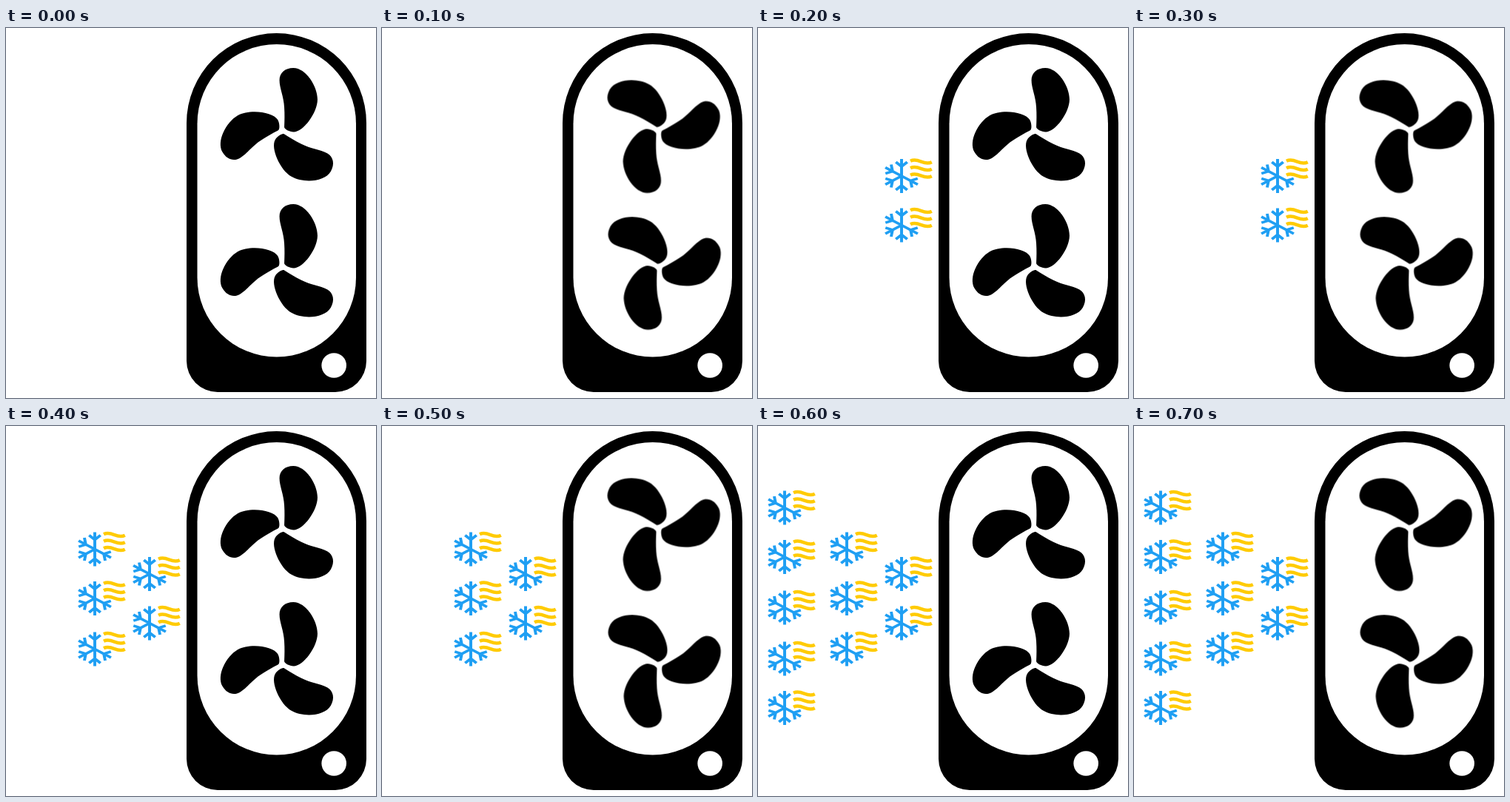
An HTML page for the animation above (800 ms loop, 500x500 px).

```html
<!DOCTYPE html>
<html lang="en">
<head>
<meta charset="utf-8">
<title>Outdoor cooling unit</title>
<style>
  html, body { margin: 0; width: 100%; height: 100%; overflow: hidden; background: #fff; }
  svg { display: block; width: 100%; height: 100%; }
  .ice { fill: none; stroke: #1f9ff3; stroke-width: 3.6; }
  .air { fill: none; stroke: #ffcb05; stroke-width: 4.4; }
</style>
</head>
<body>
<svg viewBox="0 0 500 500">
  <defs>
    <path id="blade" d="M-3.7-68C-3.7-78 4-84.5 15-84.5C32-84.5 47.7-60 47.7-42C47.7-24 28.5 2 15.5 2C10 2 2.3-2 2.8-5C3.2-14 3.4-22 2.8-31C2.2-46-3.7-57-3.7-68Z"/>
    <g id="fan">
      <use href="#blade"/>
      <use href="#blade" transform="rotate(120)"/>
      <use href="#blade" transform="rotate(240)"/>
    </g>
    <path id="arm" d="M0 0V-23M-7-18.8L0-12.8L7-18.8"/>
    <path id="wave" d="M12-20.2c5-2.6 9.500-1.200 14.500.8s9.500 3 14.300.6"/>
    <g id="flake">
      <g class="ice" transform="scale(1.1 1)">
        <use href="#arm"/>
        <use href="#arm" transform="rotate(120)"/>
        <use href="#arm" transform="rotate(180)"/>
        <use href="#arm" transform="rotate(240)"/>
        <use href="#arm" transform="rotate(300)"/>
      </g>
      <g class="air">
        <use href="#wave"/>
        <use href="#wave" y="9.5"/>
        <use href="#wave" y="19"/>
      </g>
    </g>
  </defs>

  <path d="M244 128.500a121.500 121.500 0 0 1 243 0V450a42 42 0 0 1-42 42H286a42 42 0 0 1-42-42Z"/>
  <rect x="258.500" y="22" width="214.500" height="422.500" rx="107.250" fill="#fff"/>
  <circle cx="443.200" cy="456" r="16.800" fill="#fff"/>
  <g id="scene"></g>
</svg>
<script>
  const LOOP = 800;
  const scene = document.getElementById('scene');

  // Fan centres and angle for the two alternating poses
  const poses = [
    { turn: 0, spots: [[373.25, 138.5], [373.25, 322.5]] },
    { turn: 180, spots: [[373.4, 138.5], [374.4, 323.3]] }
  ];

  // Each column of cold air appears at its own time and stays to the end
  const columns = [
    { at: 200, x: 194, ys: [200, 266.5] },
    { at: 400, x: 120, ys: [166.5, 233, 301.5] },
    { at: 600, x: 36, ys: [110.5, 177, 245.5, 314.5, 381] }
  ];

  function add(tag, parent, attrs = {}) {
    const el = document.createElementNS('http://www.w3.org/2000/svg', tag);
    for (const key in attrs) el.setAttribute(key, attrs[key]);
    return parent.appendChild(el);
  }

  function stamp(group, id, x, y, turn = 0) {
    add('use', group, { href: id, transform: `translate(${x} ${y}) rotate(${turn})` });
  }

  // Hard switch from one opacity to the other at a fraction of the cycle
  function toggle(el, before, after, at, duration) {
    const easing = 'step-end';
    const anim = el.animate([
      { opacity: before, offset: 0, easing },
      { opacity: after, offset: at, easing },
      { opacity: after, offset: 1 }
    ], { duration, iterations: Infinity });
    anim.startTime = document.timeline.currentTime;
  }

  poses.forEach(({ turn, spots }, i) => {
    const group = add('g', scene);
    for (const [x, y] of spots) stamp(group, '#fan', x, y, turn);
    toggle(group, 1 - i, i, 0.5, 200);
  });

  for (const { at, x, ys } of columns) {
    const group = add('g', scene);
    for (const y of ys) stamp(group, '#flake', x, y);
    toggle(group, 0, 1, at / LOOP, LOOP);
  }
</script>
</body>
</html>
```
